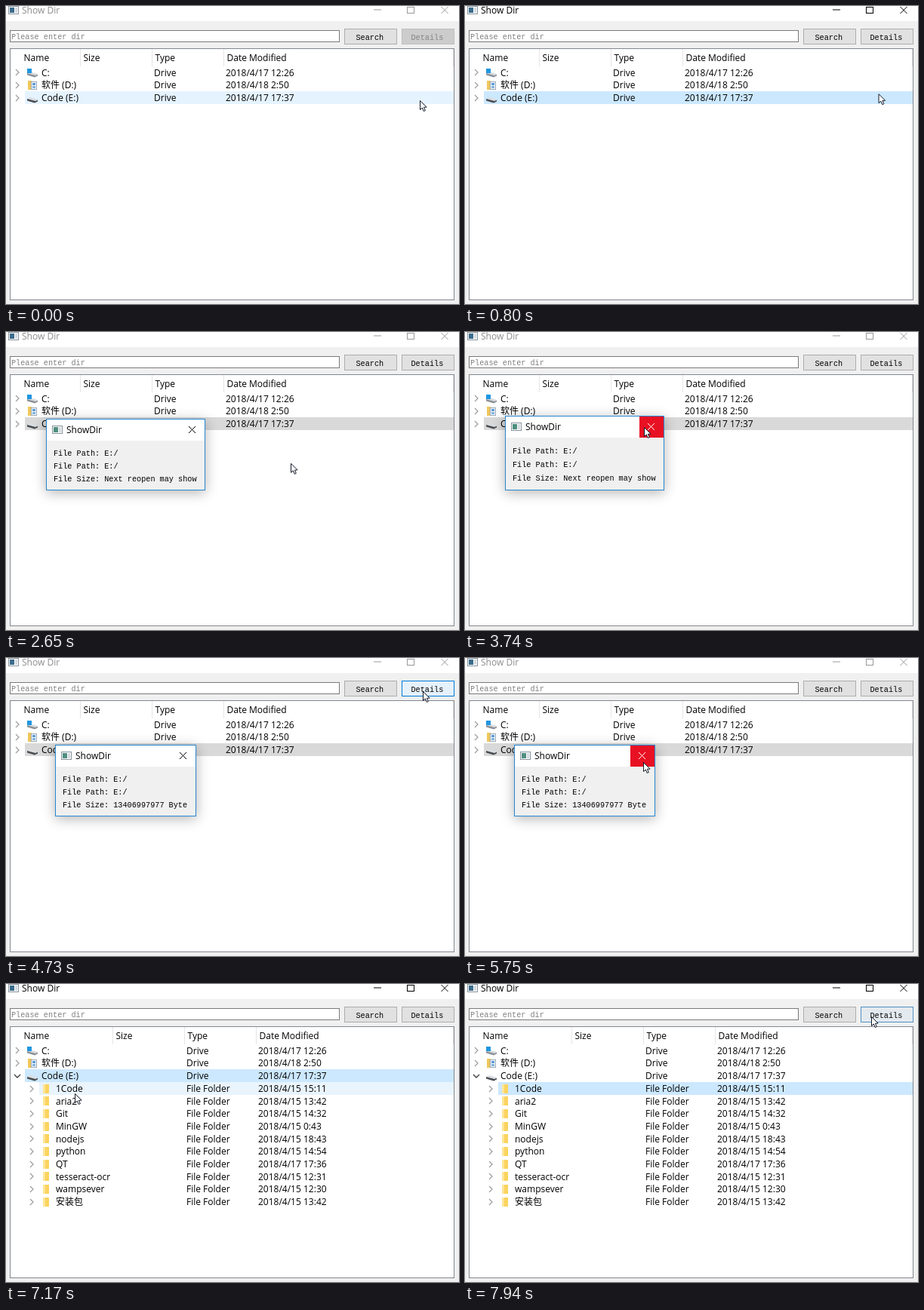
An HTML page with a canvas for the animation above (8 s loop, 600 px wide and 395 px high).

```html
<!DOCTYPE html>
<html lang="en">
<head>
<meta charset="utf-8">
<title>Show Dir</title>
<style>
  html, body { margin: 0; width: 100%; height: 100%; overflow: hidden; background: #f0f0f0; }
  canvas { display: block; }
</style>
</head>
<body>
<canvas id="stage" width="600" height="395"></canvas>
<script>
const ctx = document.getElementById('stage').getContext('2d');
const LOOP = 8000;
const UI = '12px "Open Sans", "Noto Sans CJK SC", "Noto Sans CJK", sans-serif';
const MONO = '10.2px "Liberation Mono", monospace';
const ROW_TOP = 80, ROW_HEIGHT = 16.7;

const drives = [
  ['C:', '2018/4/17 12:26', 'system'],
  ['软件 (D:)', '2018/4/18 2:50', 'library'],
  ['Code (E:)', '2018/4/17 17:37', 'drive']
];
const folders = [
  ['1Code', '2018/4/15 15:11'], ['aria2', '2018/4/15 13:42'],
  ['Git', '2018/4/15 14:32'], ['MinGW', '2018/4/15 0:43'],
  ['nodejs', '2018/4/15 18:43'], ['python', '2018/4/15 14:54'],
  ['QT', '2018/4/17 17:36'], ['tesseract-ocr', '2018/4/15 12:31'],
  ['wampsever', '2018/4/15 12:30'], ['安装包', '2018/4/15 13:42']
];

// Pointer path: time, x, y
const pointerPath = [
  [0, 548, 125], [720, 548, 126], [1100, 544, 42], [1960, 544, 42],
  [2300, 500, 110], [2730, 365, 180], [3080, 233, 115], [3300, 233, 111],
  [3510, 233, 111], [3700, 237, 126], [3850, 237, 126], [4110, 552, 44],
  [4800, 552, 44], [5130, 470, 150], [5430, 300, 185], [5600, 300, 185],
  [5740, 236, 138], [5890, 236, 138], [6380, 90, 128], [6870, 88, 128],
  [7150, 91, 145], [7360, 91, 145], [7930, 538, 43], [8000, 538, 43]
];
const activeSpans = [[100, 1370], [3880, 4430], [5880, LOOP]];
const hoverSpans = [[1010, 2020], [4040, 4860], [7860, LOOP + 500]];
const dialogs = [
  { open: 1400, close: 3860, x: 53, w: 211, red: 3640, size: 'Next reopen may show' },
  { open: 4460, close: 5870, x: 65, w: 187, red: 5690, size: '13406997977 Byte' }
];

const clamp = v => Math.max(0, Math.min(1, v));
const ramp = (t, start, length) => clamp((t - start) / length);
const ease = p => p * p * (3 - 2 * p);
const within = (t, spans) => spans.some(([a, b]) => t >= a && t < b);

function rect(x, y, w, h, fill, stroke) {
  ctx.fillStyle = fill;
  ctx.fillRect(x, y, w, h);
  if (stroke) {
    ctx.strokeStyle = stroke;
    ctx.lineWidth = 1;
    ctx.strokeRect(x + .5, y + .5, w - 1, h - 1);
  }
}

function text(value, x, y, color = '#000', font = UI) {
  ctx.font = font;
  ctx.fillStyle = color;
  ctx.fillText(value, x, y);
}

function line(points, color, width = 1) {
  ctx.beginPath();
  points.forEach(([x, y]) => ctx.lineTo(x, y));
  ctx.strokeStyle = color;
  ctx.lineWidth = width;
  ctx.stroke();
}

function polygon(points, fill) {
  ctx.beginPath();
  points.forEach(([x, y]) => ctx.lineTo(x, y));
  ctx.closePath();
  ctx.fillStyle = fill;
  ctx.fill();
}

function cross(x, y, r, color) {
  line([[x - r, y - r], [x + r, y + r]], color);
  line([[x - r, y + r], [x + r, y - r]], color);
}

function mix(a, b, p) {
  return `rgb(${a.map((v, i) => Math.round(v + (b[i] - v) * p))})`;
}

function windowIcon(x, y, color) {
  rect(x, y, 14, 11, '#fafbfc', '#8a949c');
  rect(x + 2, y + 2, 6, 7, color);
  rect(x + 9, y + 2, 3, 7, '#d5dbe0');
}

function drawTitleBar(active) {
  const color = active ? '#000' : '#999';
  rect(0, 0, 600, 20, '#fff');
  windowIcon(3, 0, '#3c6c8c');
  text('Show Dir', 21, 10, active ? '#000' : '#8c8c8c');
  line([[487, 5], [497, 5]], color);
  ctx.strokeRect(531.5, 1.5, 9, 8);
  cross(581, 5.5, 4.5, color);
}

function drawButton(x, label, labelX, hover, enabled = true) {
  const fill = enabled ? mix([225, 225, 225], [229, 241, 251], hover) : '#ccc';
  const edge = enabled ? mix([173, 173, 173], [0, 120, 215], hover) : '#bfbfbf';
  rect(x, 30, 70, 21, fill, edge);
  text(label, labelX, 45, enabled ? '#000' : '#838383', MONO);
}

function chevron(x, y, open) {
  if (open) line([[x - 4, y - 2], [x, y + 2], [x + 4, y - 2]], '#404040', 1.4);
  else line([[x - 2, y - 4], [x + 2, y], [x - 2, y + 4]], '#a0a0a0', 1.3);
}

function drawIcon(kind, x, y) {
  if (kind === 'folder') {
    rect(x + 2, y - 6, 8, 12, '#fbd35e');
    rect(x + 2, y - 6, 3, 12, '#ffe596');
  } else if (kind === 'library') {
    rect(x + 1, y - 6, 5, 12, '#f0c65c');
    rect(x + 5, y - 5, 8, 11, '#f8fbff', '#9aa9b8');
    rect(x + 7, y - 3, 4, 3, '#5b9bd5');
    rect(x + 7, y + 1, 4, 3, '#82b3dc');
  } else {
    const front = kind === 'system' ? '#8b9197' : '#494d52';
    polygon([[x, y + 1], [x + 4, y - 1], [x + 14, y + 2], [x + 11, y + 4]], '#dadde0');
    polygon([[x, y + 1], [x + 11, y + 4], [x + 14, y + 2.5], [x + 14, y + 4.5], [x + 10, y + 6.5], [x, y + 3.5]], front);
    if (kind === 'system') rect(x, y - 5, 6, 6, '#1e96e0');
  }
}

function rowFill(t, index) {
  if (index === 2) {
    if (t < 90) return '#e5f3ff';
    if (t < 1230) return '#cce8ff';
    if (t < 6480) return '#d9d9d9';
    if (t < 7340) return '#cce8ff';
  }
  if (index === 3 && t >= 7080) return t < 7340 ? '#e9f4fd' : '#cce8ff';
}

function drawRow(t, index, [name, date, kind], shift, expanded) {
  const top = ROW_TOP + index * ROW_HEIGHT;
  const middle = Math.round(top + 8.4);
  const indent = kind === 'folder' ? 19 : 0;
  const base = Math.round(top + 12.7);
  const fill = rowFill(t, index);
  if (fill) rect(25 + indent, Math.round(top), 568 - indent, 17, fill);
  chevron(15 + indent, middle, index === 2 && expanded);
  drawIcon(kind, 28 + indent, middle);
  text(name, 47 + indent, base);
  text(indent ? 'File Folder' : 'Drive', 196 + shift, base);
  text(date, 291 + shift, base);
}

function drawTree(t) {
  const expanded = t >= 6920;
  const shift = expanded ? 43 : 0;
  rect(5, 56, 589, 334, '#fff', '#828790');
  text('Name', 23.5, 73);
  [['Size', 98], ['Type', 193], ['Date Modified', 288]].forEach(([label, x]) => {
    rect(x + shift, 57, 1, 23, '#e5e5e5');
    text(label, x + shift + 4.5, 73);
  });
  rect(592, 57, 1, 23, '#e5e5e5');
  drives.forEach((row, i) => drawRow(t, i, row, shift, expanded));
  if (expanded) folders.forEach((row, i) => drawRow(t, i + 3, [...row, 'folder'], shift));
}

function drawDialog(t, dialog) {
  const { open, close, x, w, red, size } = dialog;
  const show = ease(ramp(t, open, 220)) * (1 - ramp(t, close, 150));
  if (!show) return;
  const stretch = dialog === dialogs[0] ? 4 * ramp(t, 3080, 220) : 0;
  const y = 115 - Math.round(stretch);
  const h = 210 - y;
  const scale = .9 + .1 * show;
  const centerX = x + w / 2, centerY = y + h / 2;

  ctx.save();
  ctx.globalAlpha = show;
  ctx.translate(centerX, centerY);
  ctx.scale(scale, scale);
  ctx.translate(-centerX, -centerY);
  ctx.shadowColor = 'rgba(0,0,0,.3)';
  ctx.shadowBlur = 16;
  ctx.shadowOffsetY = 3;
  rect(x, y, w, h, '#f0f0f0');
  ctx.shadowColor = 'transparent';
  rect(x, y, w, h, '#f0f0f0', '#2786d0');
  rect(x + 1, y + 1, w - 2, 28, '#fff');
  windowIcon(x + 8, y + 9, '#4f8f80');
  text('ShowDir', x + 27, y + 19);
  const hot = t >= red;
  if (hot) rect(x + w - 33, y + 1, 32, 28, '#e81123');
  cross(x + w - 17.5, y + 14.5, 4.5, hot ? '#fff' : '#000');
  ['File Path: E:/', 'File Path: E:/', 'File Size: ' + size].forEach((value, i) =>
    text(value, x + 10, 163.5 + i * 17 - stretch * (3 - i) / 4, '#000', MONO));
  ctx.restore();
}

function drawPointer(t) {
  const i = pointerPath.findIndex(point => point[0] > t);
  const [t0, x0, y0] = pointerPath[i - 1], [t1, x1, y1] = pointerPath[i];
  const p = ease(ramp(t, t0, t1 - t0));
  ctx.save();
  ctx.translate(x0 + (x1 - x0) * p + .5, y0 + (y1 - y0) * p + .5);
  polygon([[0, 0], [0, 12], [2.8, 9.5], [4.8, 14], [6.8, 13], [4.9, 8.8], [8.6, 8.6]], '#fff');
  ctx.strokeStyle = '#111827';
  ctx.lineWidth = 1;
  ctx.stroke();
  ctx.restore();
}

function draw(t) {
  rect(0, 0, 600, 395, '#f0f0f0');
  drawTitleBar(within(t, activeSpans));
  rect(5, 32, 437, 16, '#fff', '#7a7a7a');
  text('Please enter dir', 7, 44, '#808080', MONO);
  const hover = Math.max(...hoverSpans.map(([a, b]) => ramp(t, a, 150) * (1 - ramp(t, b, 150))));
  drawButton(448, 'Search', 463.5, 0);
  drawButton(524, 'Details', 536.5, hover, t >= 90);
  drawTree(t);
  dialogs.forEach(dialog => drawDialog(t, dialog));
  drawPointer(t);
}

const start = performance.now();
function tick() {
  draw((performance.now() - start) % LOOP);
  requestAnimationFrame(tick);
}
tick();
</script>
</body>
</html>
```
